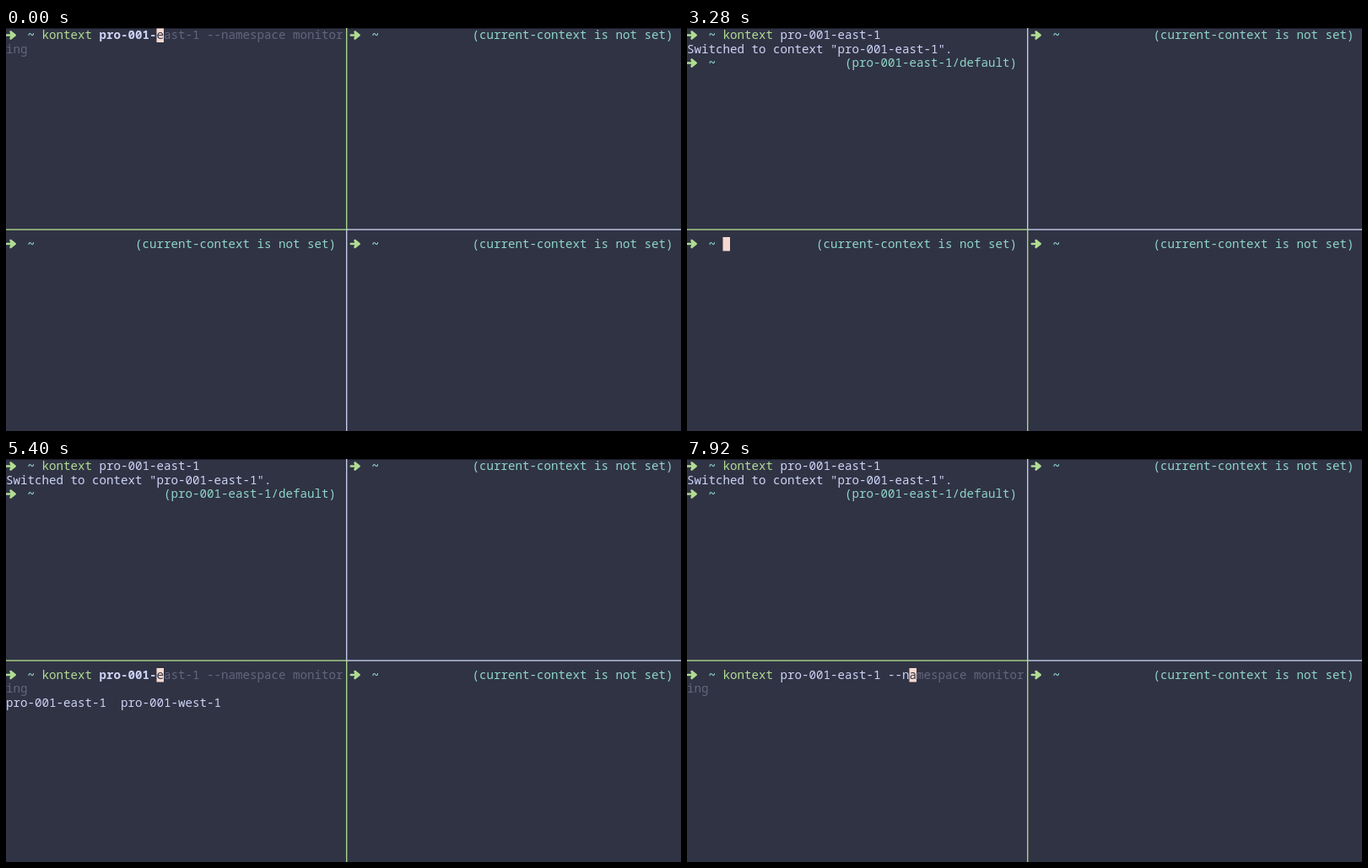
These frames come from a looping animation (800 by 478 pixels, 8 s). An HTML page:

```html
<!DOCTYPE html>
<html lang="en">
<head>
<meta charset="utf-8">
<title>Terminal panes</title>
<style>
  html, body { margin: 0; width: 100%; height: 100%; overflow: hidden; background: #303344; }
  svg { display: block; width: 100%; height: 100%; }
  text {
    font: 500 14.1667px "Noto Sans Mono", "DejaVu Sans Mono", "Liberation Mono", monospace;
    font-variant-ligatures: none;
    white-space: pre;
    fill: #cdd4f6;
  }
  text.green { fill: #b1dc93; }
  text.teal { fill: #8fd6c9; }
  text.ghost { fill: #62667c; }
  text.dark { fill: #303344; }
  text.bold { font-weight: 700; }
  text.tilde { fill: #8fd6c9; font-weight: 700; }
  .arrow { fill: #b1dc93; stroke: #b1dc93; stroke-width: 2.6; stroke-linejoin: round; stroke-linecap: round; }
  .cursor { fill: #f7d9d0; }
  .mark { fill: #cdd4f6; }
  .edge { fill: #c3caea; }
  .edge.on { fill: #a9d58b; }
</style>
</head>
<body>
<svg id="stage" viewBox="0 0 800 478"></svg>
<script>
{
const LOOP = 8000, CW = 8.5, RH = 16.5, COLS = 47, LOW = 15, RIGHT = 48;
const SWITCH = 3280;
const UNSET = '(current-context is not set)';
const NAME = 'pro-001-east-1';
const CONTEXT = `(${NAME}/default)`;
const MATCHES = [NAME, 'pro-001-west-1'];
const NS = '--namespace monitoring';
const OLD = 'kontext --kubeconfig ~/.kube/config-dev pro-001-east-1 --namespace foo';

const svg = document.getElementById('stage');
let out = '';

const colX = col => col * CW;
const rowY = row => 0.5 + row * RH;
const rect = (x, y, w, h, cls) =>
  out += `<rect x="${x}" y="${y}" width="${w}" height="${h}" class="${cls}"/>`;
const block = (col, row, cls, n = 1) => rect(colX(col), rowY(row), n * CW, RH, cls);

function put(col, row, str, cls = '') {
  const xs = [...str].map((c, i) => colX(col + i)).join(' ');
  out += `<text x="${xs}" y="${rowY(row) + 12.7}" class="${cls}">${str}</text>`;
}

// Writes text that may run over the pane's right side
function wrap(pos, row, str, cls) {
  const room = COLS - pos;
  if (str) put(pos, row, str.slice(0, room), cls);
  if (str.length > room) put(0, row + 1, str.slice(room), cls);
}

function prompt(col, row, note, width = 46) {
  const x = colX(col), y = rowY(row) + 8;
  out += `<path class="arrow" d="M${x + 0.8} ${y}H${x + 9}M${x + 5.6} ${y - 4}L${x + 10.6} ${y}L${x + 5.6} ${y + 4}L${x + 7} ${y}Z"/>`;
  put(col + 3, row, '~', 'tilde');
  if (note) put(col + width - note.length, row, note, 'teal');
}

// Prompt with typed text, cursor and grey suggestion
function type(row, typed, ghost = '', { bold, plain, note } = {}) {
  prompt(0, row, note);
  const cut = typed.includes(' ') ? typed.indexOf(' ') : typed.length;
  put(5, row, typed.slice(0, cut), plain ? '' : 'green');
  if (cut < typed.length) put(5 + cut, row, typed.slice(cut), bold ? 'bold' : '');
  const at = 5 + typed.length;
  block(at, row, 'cursor');
  if (ghost) {
    put(at, row, ghost[0], 'dark');
    wrap(at + 1, row, ghost.slice(1), 'ghost');
  }
}

function matches(row, picked) {
  if (picked) block(0, row, 'mark', NAME.length);
  put(0, row, MATCHES[0], picked ? 'dark' : '');
  put(NAME.length + 2, row, MATCHES[1]);
}

const partial = row => type(row, 'kontext pro-001-', 'east-1 ' + NS, { bold: true });
const full = (row, extra = '', ghost = '') => type(row, `kontext ${NAME} ${extra}`, ghost);
const recall = (n, opts) => type(LOW, OLD.slice(0, n), OLD.slice(n), opts);
const listed = row => { partial(row); matches(row + 2); };
const picking = row => { full(row); matches(row + 1, true); };

function ran(said) {
  prompt(0, 0);
  put(5, 0, 'kontext', 'green');
  put(13, 0, NAME);
  if (said) put(0, 1, `Switched to context "${NAME}".`);
}

function done() {
  ran(true);
  prompt(0, 2, CONTEXT);
}

const steps = [
  [0, () => partial(0)],
  [20, () => listed(0)],
  [700, () => picking(0)],
  [1120, () => full(0)],
  [2180, () => { ran(false); block(0, 1, 'cursor'); }],
  [2240, () => { ran(true); block(0, 2, 'cursor'); }],
  [2360, () => { done(); block(5, 2, 'cursor'); }],
  [SWITCH, () => { prompt(0, LOW, UNSET); block(5, LOW, 'cursor'); }],
  [4020, () => type(LOW, 'k', '', { note: UNSET })],
  [4060, () => recall(1)],
  [4120, () => recall(2)],
  [4300, () => recall(3)],
  [4380, () => recall(4)],
  [4460, () => recall(5)],
  [4680, () => type(LOW, 'kontext ', '', { plain: true })],
  [4740, () => recall(8, { plain: true })],
  [5040, () => type(LOW, 'kontext p')],
  [5060, () => type(LOW, 'kontext p', NAME.slice(1) + ' ' + NS)],
  [5400, () => listed(LOW)],
  [5820, () => picking(LOW)],
  [6240, () => full(LOW)],
  [7100, () => full(LOW, '-')],
  [7140, () => full(LOW, '-', NS.slice(1))],
  [7540, () => full(LOW, '--', NS.slice(2))],
  [7920, () => full(LOW, '--n', NS.slice(3))]
];

function paint([time, draw]) {
  const low = time >= SWITCH;
  out = '<rect width="800" height="478" fill="#303344"/><rect width="800" height="1" fill="#171923"/>';
  rect(403, 0, 1.4, 239, low ? 'edge' : 'edge on');
  rect(403, 239, 1.4, 239, low ? 'edge on' : 'edge');
  rect(404, 238.4, 396, 1.4, 'edge');
  rect(0, 238.4, 404.4, 1.4, 'edge on');
  prompt(RIGHT, 0, UNSET, 45);
  prompt(RIGHT, LOW, UNSET, 45);
  if (low) done();
  else prompt(0, LOW, UNSET);
  draw();
  svg.innerHTML = out;
}

let shown;
const start = performance.now();

function tick() {
  const t = (performance.now() - start) % LOOP;
  const step = steps.filter(s => s[0] <= t).pop() || steps[0];
  if (step !== shown) paint(shown = step);
  requestAnimationFrame(tick);
}
tick();
}
</script>
</body>
</html>
```
